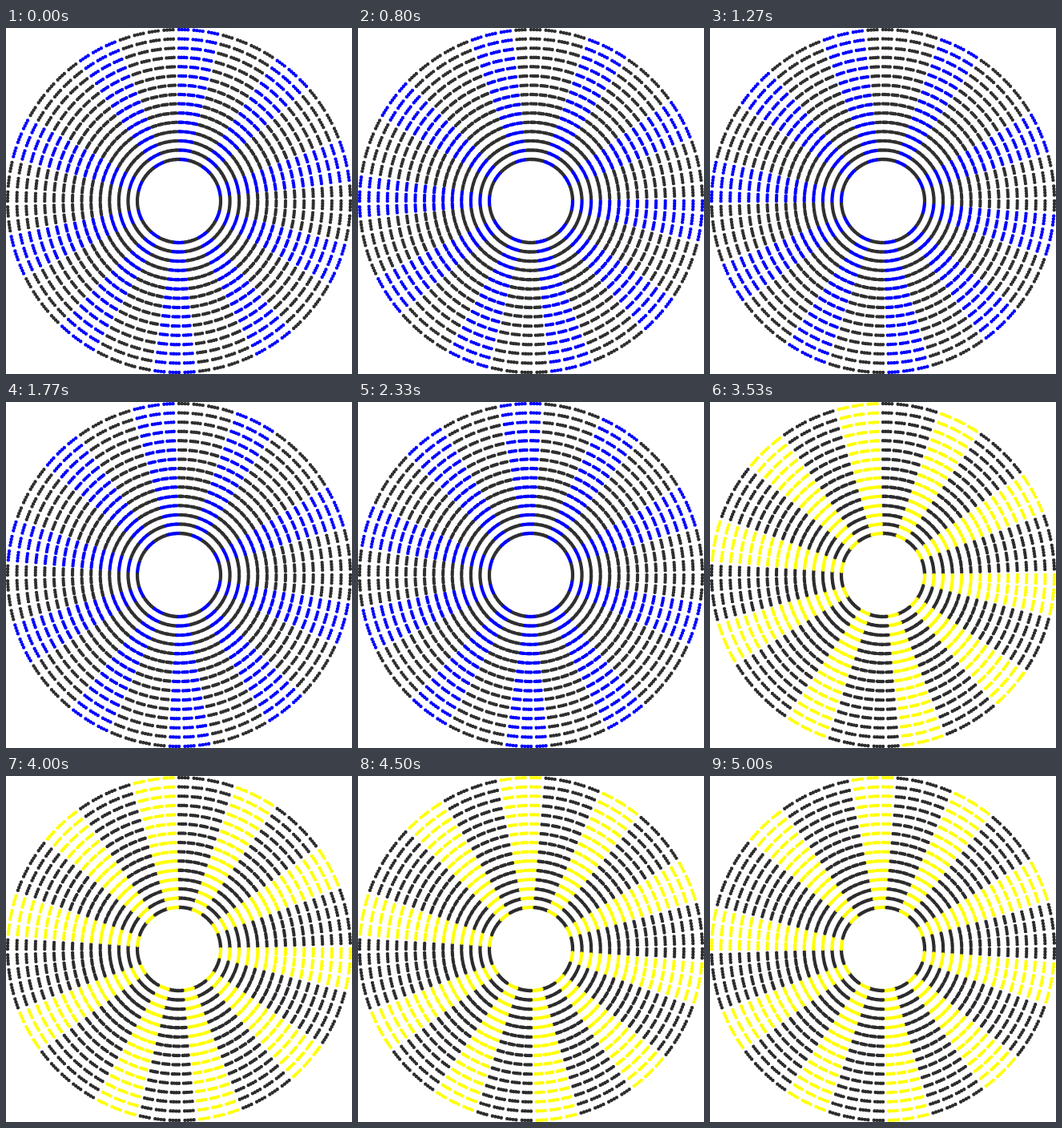
Write an HTML page with a canvas that moves like this. It is 432 px wide and 432 px high and loops after 5.06 s.

```html
<!DOCTYPE html>
<html lang="en">
<head>
<meta charset="utf-8">
<title>Turning rings</title>
<style>
html, body { margin: 0; width: 100%; height: 100%; overflow: hidden; background: #fff; }
canvas { display: block; width: 432px; height: 432px; }
</style>
</head>
<body>
<canvas id="stage" width="432" height="432"></canvas>
<script>
const ctx = document.getElementById('stage').getContext('2d');
const LOOP = 5060, STEPS = 72, HALF = STEPS / 2;
const CENTER = 216, RINGS = 15, INNER = 52, OUTER = 214;
const DASHES = 72, DOTS = 4, DOT_RADIUS = 2.2;
const BANDS = 10, BAND_WIDTH = 3;
const phases = [
  { start: 57, accent: '#0000ff', dark: '#2f2f2f' },
  { start: 25, accent: '#ffff00', dark: '#2c2c2f' }
];

const mod = (a, n) => ((a % n) + n) % n;

// One radial column of dashes, four dots a degree apart on every ring.
function makeColumn(index) {
  const path = new Path2D();
  for (let ring = 0; ring < RINGS; ring++) {
    const radius = INNER + (OUTER - INNER) * ring / (RINGS - 1);
    for (let dot = 0; dot < DOTS; dot++) {
      const angle = (index * 360 / DASHES + dot) * Math.PI / 180;
      const x = CENTER + radius * Math.sin(angle);
      const y = CENTER - radius * Math.cos(angle);
      path.moveTo(x + DOT_RADIUS, y);
      path.arc(x, y, DOT_RADIUS, 0, 2 * Math.PI);
    }
  }
  return path;
}

const columns = Array.from({ length: DASHES }, (_, i) => makeColumn(i));

// Bands start 7 dashes apart, but 8 on both sides of the leading band.
function accentColumns(lead) {
  const accents = new Set();
  for (let band = 0; band < BANDS; band++) {
    const start = lead + band * 7 + (band > 0 ? 1 : 0);
    for (let i = 0; i < BAND_WIDTH; i++) accents.add(mod(start + i, DASHES));
  }
  return accents;
}

function stepAt(time) {
  const tick = Math.floor((time + 4) * 0.03);
  return Math.min(STEPS - 1, Math.floor(tick * 19 / 40));
}

function draw(step) {
  const phase = phases[Math.floor(step / HALF)];
  const local = step % HALF;
  const accents = accentColumns(phase.start + local + Math.floor(local / 12));
  ctx.fillStyle = '#fff';
  ctx.fillRect(0, 0, 432, 432);
  columns.forEach((column, i) => {
    ctx.fillStyle = accents.has(i) ? phase.accent : phase.dark;
    ctx.fill(column);
  });
}

let shown = 0;
const origin = performance.now();

function tick() {
  const step = stepAt(Math.max(0, performance.now() - origin) % LOOP);
  if (step !== shown) draw(shown = step);
  requestAnimationFrame(tick);
}

draw(shown);
requestAnimationFrame(tick);
</script>
</body>
</html>
```
